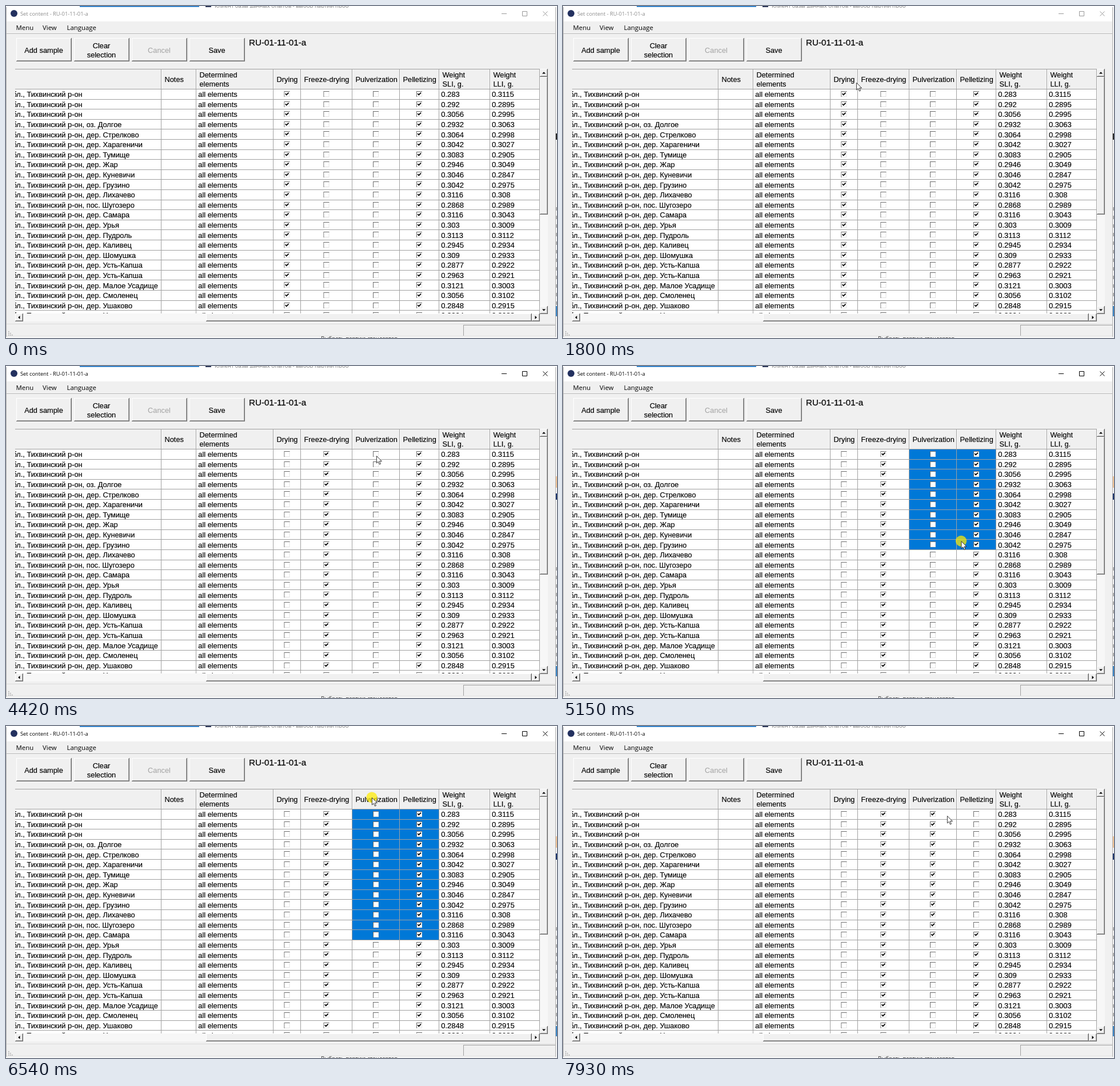
Animation of 964x581 px, one loop 8 s. Source, as an HTML page:

```html
<!DOCTYPE html>
<html lang="en">
<head>
<meta charset="utf-8">
<title>Set content</title>
<style>
  html, body { margin: 0; width: 100%; height: 100%; overflow: hidden; background: #f0f0f0; }
  svg { display: block; width: 964px; height: 581px; }
  text { font: 12.8px "Liberation Sans", Arial, sans-serif; fill: #000; stroke: #000; stroke-width: .15px; white-space: pre; }
  .ui { font: 11.4px "Open Sans", "Noto Sans", sans-serif; stroke: none; }
  .title { font: 9.3px "Open Sans", "Noto Sans", sans-serif; fill: #8c8c8c; stroke: none; }
  .code { font-size: 15.2px; stroke-width: .25px; }
  .num { font-size: 13px; }
  .mid { text-anchor: middle; }
  .off { fill: #a2a2a2; stroke: none; }
  .behind { font: 9.6px "Open Sans", "Noto Sans", sans-serif; fill: #777; stroke: none; }
  .below { fill: #222; }
  .glyphs { fill: none; stroke: #999; }
  .active .title { fill: #000; }
  .active .glyphs { stroke: #000; }
  .edge { visibility: hidden; }
  .active .edge { visibility: visible; }
  .tick { fill: none; stroke: #000; stroke-width: 1.7; }
  .hide { display: none; }
</style>
</head>
<body>
<svg id="stage" viewBox="0 0 964 581">
  <defs>
    <clipPath id="view"><rect x="16" y="110" width="918" height="428"/></clipPath>
    <g id="box">
      <rect width="10" height="10" fill="#e3e3e3"/>
      <path d="M0 0H10V1H1V10H0Z" fill="#6c6c6c"/>
      <rect x="1" y="1" width="8" height="8" fill="#fff"/>
    </g>
  </defs>
  <g id="frame"></g>
  <g id="table" clip-path="url(#view)"></g>
  <path id="blank" fill="#e3e3e3"/>
  <g id="pointer">
    <circle id="press" r="9.6" fill="#ffeb00" fill-opacity=".72"/>
    <path d="M.4 .5V13L3.3 10.4L5.4 15.2L7.4 14.3L5.4 9.7H9.4Z" fill="#fff" stroke="#222" stroke-width=".9"/>
  </g>
</svg>
<script>
const $ = id => document.getElementById(id);
const LOOP = 8000, TOP = 146, ROW = 17.6, STEP = 76;

const places = `|||оз. Долгое|дер. Стрелково|дер. Харагеничи|дер. Тумище|дер. Жар|дер. Куневичи|дер. Грузино|дер. Лихачево|пос. Шугозеро|дер. Самара|дер. Урья|дер. Пудроль|дер. Каливец|дер. Шомушка|дер. Усть-Капша|дер. Усть-Капша|дер. Малое Усадище|дер. Смоленец|дер. Ушаково|дер. Новое`.split('|');
const heads = 'Notes|Determined/elements|Drying|Freeze-drying|Pulverization|Pelletizing|Weight/SLI, g.|Weight/LLI, g.'.split('|');
const walls = [271, 332, 467, 515, 605, 688, 757, 846, 933];
const boxes = [2, 3, 4, 5].map(i => (walls[i] + walls[i + 1]) / 2 - 4.5);

let seed = 7;
const random = () => (seed = seed * 16807 % 2147483647) / 2147483647;
const weight = () => String(+(0.283 + random() * 0.031).toFixed(4));

const rect = (x, y, w, h, fill, more = '') =>
  `<rect x="${x}" y="${y}" width="${w}" height="${h}" fill="${fill}" ${more}/>`;
const text = (x, y, s, cls = '') => `<text x="${x}" y="${y}" class="${cls}">${s}</text>`;
const raised = (x, y, w, h) =>
  rect(x, y, w, h, '#696969') + rect(x, y, w - 1, h - 1, '#fff') +
  rect(x + 1, y + 1, w - 2, h - 2, '#a0a0a0') + rect(x + 1, y + 1, w - 3, h - 3, '#f0f0f0');
const arrow = (x, y, turn) =>
  `<path d="M-3 1.5L0 -1.8L3 1.5Z" transform="translate(${x} ${y}) rotate(${turn})"/>`;
const scrollButton = (x, y, turn) => raised(x, y, 14, 14) + arrow(x + 7, y + 7, turn);
const rowY = i => Math.round(TOP + ROW * i);

function buildFrame() {
  let s = rect(0, 0, 964, 581, '#f0f0f0') + rect(0, 0, 964, 27, '#fff');
  // slivers of what lies behind the window
  s += text(365, 2.6, 'Клиент базы данных опытов - выбор партии проб', 'behind');
  s += rect(129, 0, 209, 1.6, '#0f6fc6') + rect(349, 0, 10, 2, '#2a3558');
  s += rect(1, 3, 960, 23, '#fff');
  // title bar and menu
  s += '<circle cx="14" cy="13" r="6" fill="#23315f"/>';
  s += text(25, 16.6, 'Set content - RU-01-11-01-a', 'title');
  s += '<path class="glyphs" d="M867 13.5H876M903.5 9.5H911.5V17.5H903.5ZM939.5 9.5L947.5 17.5M947.5 9.5L939.5 17.5"/>';
  s += text(17.5, 42.2, 'Menu', 'ui') + text(64, 42.2, 'View', 'ui') + text(106.5, 42.2, 'Language', 'ui');
  s += rect(1, 48, 960, 1, '#b4b4b4') + rect(1, 49, 960, 1, '#fafafa');
  // toolbar
  ['Add sample', 'Clear/selection', 'Cancel', 'Save'].forEach((label, i) => {
    const x = 18 + i * 101, lines = label.split('/');
    s += raised(x, 56, 97, 41);
    lines.forEach((line, k) =>
      s += text(x + 48, 81.6 + (k - (lines.length - 1) / 2) * 16, line, i === 2 ? 'mid off' : 'mid'));
  });
  s += text(425, 69, 'RU-01-11-01-a', 'code');
  // scroll bars
  s += rect(934, 110, 14, 429, '#f7f7f7') + raised(934, 124, 14, 241);
  s += rect(16, 538, 918, 14, '#f7f7f7') + raised(350, 538, 570, 14);
  s += scrollButton(934, 110, 0) + scrollButton(934, 525, 180) + scrollButton(16, 538, -90) + scrollButton(920, 538, 90);
  // status bar
  s += rect(1, 556, 960, 1, '#dcdcdc') + rect(800, 558, 161, 19, '#a0a0a0') + rect(801, 559, 160, 18, '#f0f0f0');
  for (let r = 0; r < 3; r++)
    for (let c = 0; c <= r; c++) s += rect(4 + 3 * c, 569 + 3 * r, 1.6, 1.6, '#a8a8a8');
  // outer edges
  s += rect(0, 579, 964, 2, '#f8f8f8') + rect(0, 577, 964, 1, '#e2e2e2');
  s += text(551, 584.8, 'Выбрать партию стандартов', 'behind below');
  s += rect(0, 2, 1, 577, '#b0b0b0') + rect(961, 2, 1, 577, '#b0b0b0');
  s += rect(962, 2, 2, 579, '#f6f6f6') + rect(962, 223, 2, 11, '#222') + rect(962, 525, 2, 18, '#3a86c8');
  for (let y = 352; y < 520; y += 15) s += rect(962.5, y, 1.5, 6, '#999');
  s += rect(962, 193, 2, 20, '#f3c79a', 'class="edge"') + rect(962, 223, 2, 11, '#16306c', 'class="edge"');
  $('frame').innerHTML = s;
}

function buildTable() {
  let s = rect(16, 110, 918, 36, '#f0f0f0') + rect(16, TOP, 918, 400, '#fff');
  places.forEach((place, i) => {
    const y = rowY(i), base = TOP + ROW * i + 13.1;
    for (const c of [4, 5])
      s += rect(walls[c] + 1, y, walls[c + 1] - walls[c] - 1, 18, '#0078d7', 'class="sel"');
    s += text(4.4, base, 'обл., Тихвинский р-он' + (place && ', ' + place)) + text(336.3, base, 'all elements');
    s += text(761.2, base, weight(), 'num') + text(850, base, weight(), 'num');
    for (const x of boxes)
      s += `<g transform="translate(${x} ${y + 3})"><use href="#box"/><path class="tick" d="M2.2 4.2L4.2 6.4L8 2.6"/></g>`;
    s += rect(16, rowY(i + 1) - 1, 918, 1, '#a0a0a0');
  });
  s += rect(16, 110, 918, 1, '#a0a0a0') + rect(16, 145, 918, 1, '#a0a0a0');
  for (const x of walls) s += rect(x, 110, 1, 429, '#a0a0a0') + rect(x + 1, 111, 1, 34, '#fff');
  heads.forEach((head, i) => {
    const lines = head.split('/');
    lines.forEach((line, k) =>
      s += text(walls[i] + 6.5, 132.8 + (k - (lines.length - 1) / 2) * 15.8, line));
  });
  $('table').innerHTML = s;
}

// pointer moves: first step, last step, x, y, sideways bow
const moves = [
  [310, 1090, 583, 194, 0.1],
  [1170, 1940, 490, 132, -0.34],
  [2020, 2180, 488, 128, 0],
  [3040, 3190, 564, 136, 0],
  [4050, 4420, 648, 157, 0],
  [4830, 5300, 716, 366, 0],
  [5690, 6200, 635, 113, -0.2],
  [6200, 6310, 640, 125, 0],
  [6690, 6770, 651, 135, 0],
  [6850, 7310, 719, 128, 0],
  [7630, 7930, 672, 157, 0],
];
const presses = [[2560, 2790], [3420, 3570], [4590, 5690], [6540, 6690]];
// areas left empty while the table repaints
const blanks = [
  [3490, 3570, 'M535 357H606V539H535Z'],
  [5300, 5380, 'M535 410H758V392H934V539H535Z'],
  [6690, 6770, 'M272 110H934V539H272Z'],
  [6770, 6850, 'M535 357H934V539H535Z'],
];
const within = (t, [a, b]) => t >= a && t < b;

function pointerAt(t) {
  let x = 672, y = 600;
  for (const [from, to, endX, endY, bow] of moves) {
    if (t < from) break;
    const steps = Math.round((to - from) / STEP);
    const step = Math.floor((t - from) / (to - from) * steps + 1e-6);
    const p = Math.min(1, (step + 1) / (steps + 1));
    const dx = endX - x, dy = endY - y, side = 2 * bow * p * (1 - p);
    x += dx * p + dy * side;
    y += dy * p - dx * side;
  }
  return [x, y];
}

buildFrame();
buildTable();
const ticks = [...document.querySelectorAll('.tick')];
const sels = [...document.querySelectorAll('.sel')];
const show = (el, on) => el.classList.toggle('hide', !on);

function draw(t) {
  $('stage').classList.toggle('active', t >= 2560);
  $('pointer').setAttribute('transform', `translate(${pointerAt(t)})`);
  show($('press'), presses.some(p => within(t, p)));

  const blank = blanks.find(b => within(t, b));
  $('blank').setAttribute('d', blank ? blank[2] : '');

  let rows = 0, cols = 0;
  if (within(t, [4680, 6690])) {
    const [x, y] = pointerAt(Math.min(t, 5300));
    rows = Math.floor((y - TOP) / ROW) + 1;
    cols = x > walls[5] ? 2 : 1;
  }
  sels.forEach((el, i) => show(el, (i >> 1) < rows && i % 2 < cols));

  const swapped = t >= 6690;
  ticks.forEach((el, i) => {
    const row = i >> 2;
    show(el, [t < 2640, t >= 3490, swapped && row < 13, !(swapped && row < 12)][i % 4]);
  });
}

const start = performance.now();
function tick() {
  draw((performance.now() - start) % LOOP);
  requestAnimationFrame(tick);
}
tick();
</script>
</body>
</html>
```
